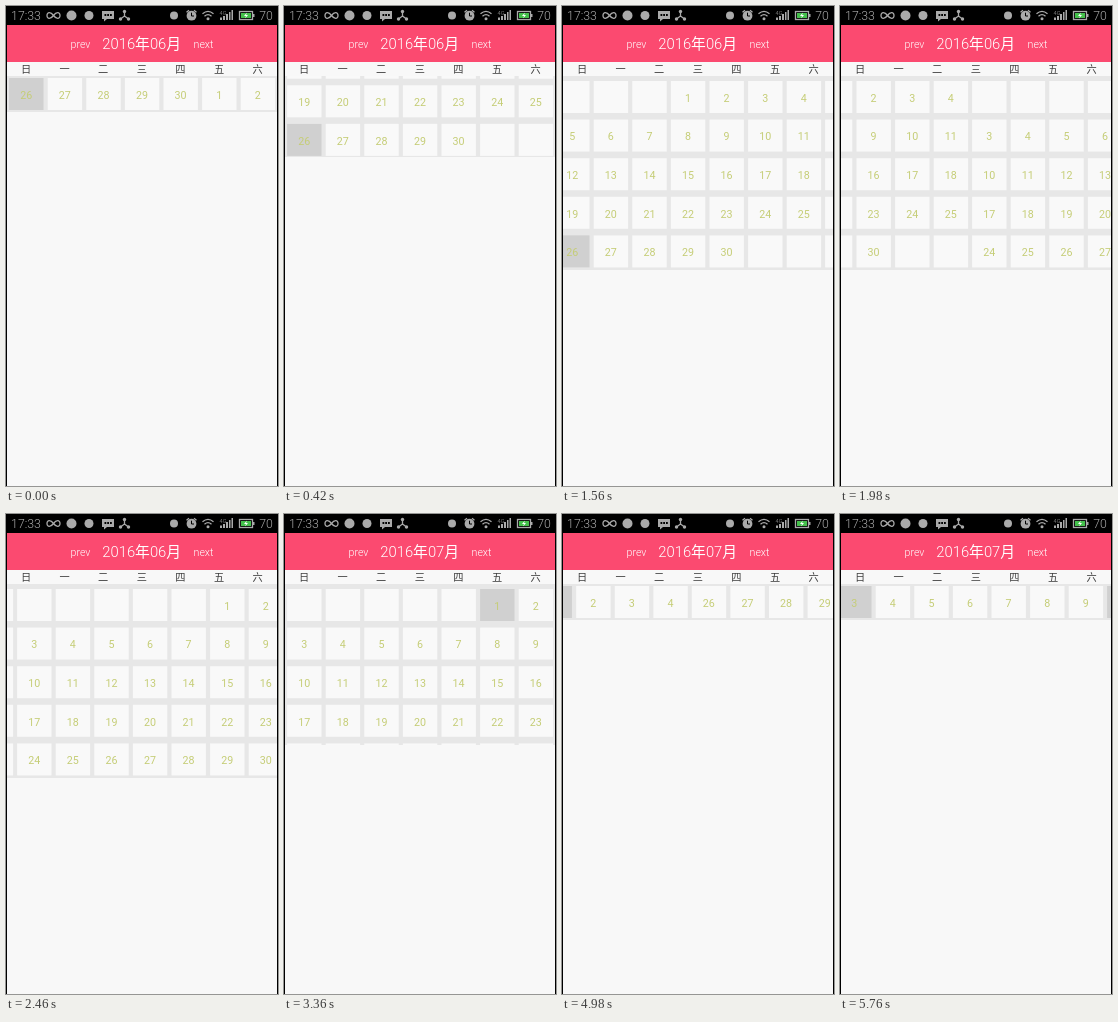
Animation of 272x480 px, one loop 5.82 s. Source, as an HTML page:

```html
<!DOCTYPE html>
<html lang="zh">
<head>
<meta charset="utf-8">
<title>Calendar</title>
<style>
html, body { margin: 0; width: 100%; height: 100%; overflow: hidden; background: #000; }
svg { display: block; width: 272px; height: 480px; font-family: Roboto, "Noto Sans CJK SC", "Noto Sans CJK", sans-serif; }
text { text-anchor: middle; }
#status { fill: #aaa; font-weight: 300; font-size: 12.3px; }
#status .line { fill: none; stroke: #aaa; stroke-width: 1.3; }
#head { fill: #fff; font-weight: 300; font-size: 10.6px; }
#week { fill: #3c3c3c; font-size: 10.2px; }
#grid { fill: #c5cd76; font-size: 10.7px; }
</style>
</head>
<body>
<svg viewBox="0 0 272 480">
  <clipPath id="clip"><rect id="view" x="1" y="70" width="270" height="36"/></clipPath>
  <rect width="272" height="480"/>
  <rect x="1" y="56" width="270" height="424" fill="#f8f8f8"/>
  <g clip-path="url(#clip)">
    <rect x="1" y="70" width="270" height="240" fill="#e7e7e7"/>
    <g id="grid"></g>
  </g>
  <g id="week"></g>
  <g id="head">
    <rect x="1" y="19" width="270" height="37" fill="#fb4a70"/>
    <text x="74.5" y="41.5">prev</text>
    <text id="title" x="135.7" y="43.2" font-size="14.8"></text>
    <text x="197.5" y="41.5">next</text>
  </g>
  <g id="status">
    <text x="20" y="14.2">17:33</text>
    <path class="line" d="M47.5 9.5C45 6 41 5.500 41 9.500S45 13 47.500 9.500S54 5.500 54 9.500S50 13 47.500 9.500Z"/>
    <circle cx="65.500" cy="9.500" r="5"/>
    <circle cx="83" cy="9.500" r="4.500"/>
    <path d="M96 5h12v8h-7l-3 2.500v-2.500h-2z"/>
    <path d="M98.500 8h1.800v2h-1.800zM101.200 8h1.800v2h-1.800zM104 8h1.800v2h-1.800z" fill="#000"/>
    <path class="line" d="M118.500 5.500V10L114.500 13M118.500 10L122.500 13"/>
    <circle cx="118.500" cy="5.500" r="1.700"/><circle cx="114.500" cy="13" r="1.700"/><circle cx="122.500" cy="13" r="1.700"/>
    <circle cx="168" cy="9.500" r="4"/>
    <circle cx="185.500" cy="9.700" r="4.900"/>
    <path class="line" d="M180.500 6.200L183 4.200M190.500 6.200L188 4.200"/>
    <path d="M185.500 6.700V10H188" fill="none" stroke="#000"/>
    <path class="line" d="M196.500 7.800Q202 3 207.500 7.800M198.500 10.300Q202 7 205.500 10.300"/>
    <circle cx="202" cy="12.700" r="1.500"/>
    <path d="M214 11.500h2v2.500h-2zM217 10h2v4h-2zM220 8h2v6h-2zM223 6h1.500v8H223zM225.500 4h1.500v10h-1.500z"/>
    <text x="217" y="8.500" font-size="5.500">4G</text>
    <rect class="line" x="233.500" y="5.500" width="13" height="8" stroke-width="1"/>
    <path d="M247 8h1.500v3H247z"/>
    <rect x="235" y="7" width="10" height="5" fill="#45c04c"/>
    <path d="M241 6.500L238 10H240L239 12.500L242 9H240z" fill="#fff"/>
    <text x="260" y="14.200">70</text>
  </g>
</svg>
<script>
const LOOP = 5820, STEP = 60, PITCH = 38.6, PAGE = 270;
const $ = id => document.getElementById(id);

const june = { first: 3, days: 30 }, july = { first: 5, days: 31 };
const page = (month, row, sel) => ({ ...month, row, sel });
const juneEnd = page(june, 4, 26), juneStart = page(june, 0, 1);
const julyStart = page(july, 0, 1), julyNext = page(july, 1, 3), julyThird = page(july, 2, 10);

// [time, value] pairs
const bottomKeys = [[0, 106], [180, 122], [420, 151], [600, 179], [780, 218], [960, 254], [1080, 260],
  [1200, 263], [1380, 264], [2820, 264], [2880, 302], [3120, 302], [3240, 270], [3360, 231],
  [3480, 197], [3600, 176], [3900, 106]];
const scrollKeys = [[0, -157.4], [180, -141], [420, -111.5], [600, -85], [780, -43], [960, -5.5],
  [1200, -1], [1380, 0], [3660, 0], [3900, -3]];
const slideKeys = [[1500, 0], [1620, -20], [1800, -75], [1980, -141], [2100, -190], [2220, -228],
  [2340, -250], [2460, -262], [2640, -270], [2820, -270], [2880, 0],
  [4020, 0], [4140, 40], [4260, 130], [4380, 230], [4440, 258], [4500, 268], [4560, 270],
  [4680, 270], [4860, 200], [5040, 90], [5160, 40], [5280, 12], [5400, 0], [5700, 0], [5760, -6]];

function track(keys, t) {
  const i = keys.findIndex(k => k[0] > t);
  if (i === 0) return keys[0][1];
  if (i < 0) return keys[keys.length - 1][1];
  const [t0, a] = keys[i - 1], [t1, b] = keys[i];
  return a + (b - a) * (t - t0) / (t1 - t0);
}

function label(p, n, weekly) {
  if (n > 0 && n <= p.days) return n;
  if (!weekly) return "";
  return n < 1 ? n + 30 : n - p.days;
}

function drawPage(p, x, scroll, weekly, showSel) {
  let out = "";
  for (let r = 0; r < 6; r++) {
    if (weekly && r !== p.row) continue;
    const y = weekly ? 72 : 75 + PITCH * r + scroll;
    for (let c = 0; c < 7; c++) {
      const left = x + 3.1 + PITCH * c, n = r * 7 + c - p.first + 1;
      const fill = showSel && n === p.sel ? "#d0d0d0" : "#f9f9f9";
      out += `<rect x="${left}" y="${y}" width="34.4" height="32" fill="${fill}"/>` +
        `<text x="${left + 17.1}" y="${y + 20.8}">${label(p, n, weekly)}</text>`;
    }
  }
  return out;
}

function render(t) {
  const weekly = t < 60 || t >= 3900;
  const x = track(slideKeys, t), scroll = track(scrollKeys, t);
  const pages = t < 2880 ? [null, juneEnd, julyStart]
    : t < 5520 ? [juneStart, julyStart, null]
    : [null, julyNext, julyThird];
  $("grid").innerHTML = pages.map((p, i) => {
    const left = x + (i - 1) * PAGE;
    if (!p || Math.abs(left) >= PAGE) return "";
    return drawPage(p, left, scroll, weekly, p !== julyStart || t >= 2880);
  }).join("");
  $("view").setAttribute("height", track(bottomKeys, t) - 70);
  $("title").textContent = t < 2880 ? "2016年06月" : "2016年07月";
}

$("week").innerHTML = [..."日一二三四五六"].map((d, i) =>
  `<text x="${20 + PITCH * i}" y="67.3">${d}</text>`).join("");

let last = -1;
function tick() {
  const t = Math.floor(performance.now() % LOOP / STEP) * STEP;
  if (t !== last) render(last = t);
  requestAnimationFrame(tick);
}
tick();
</script>
</body>
</html>
```
